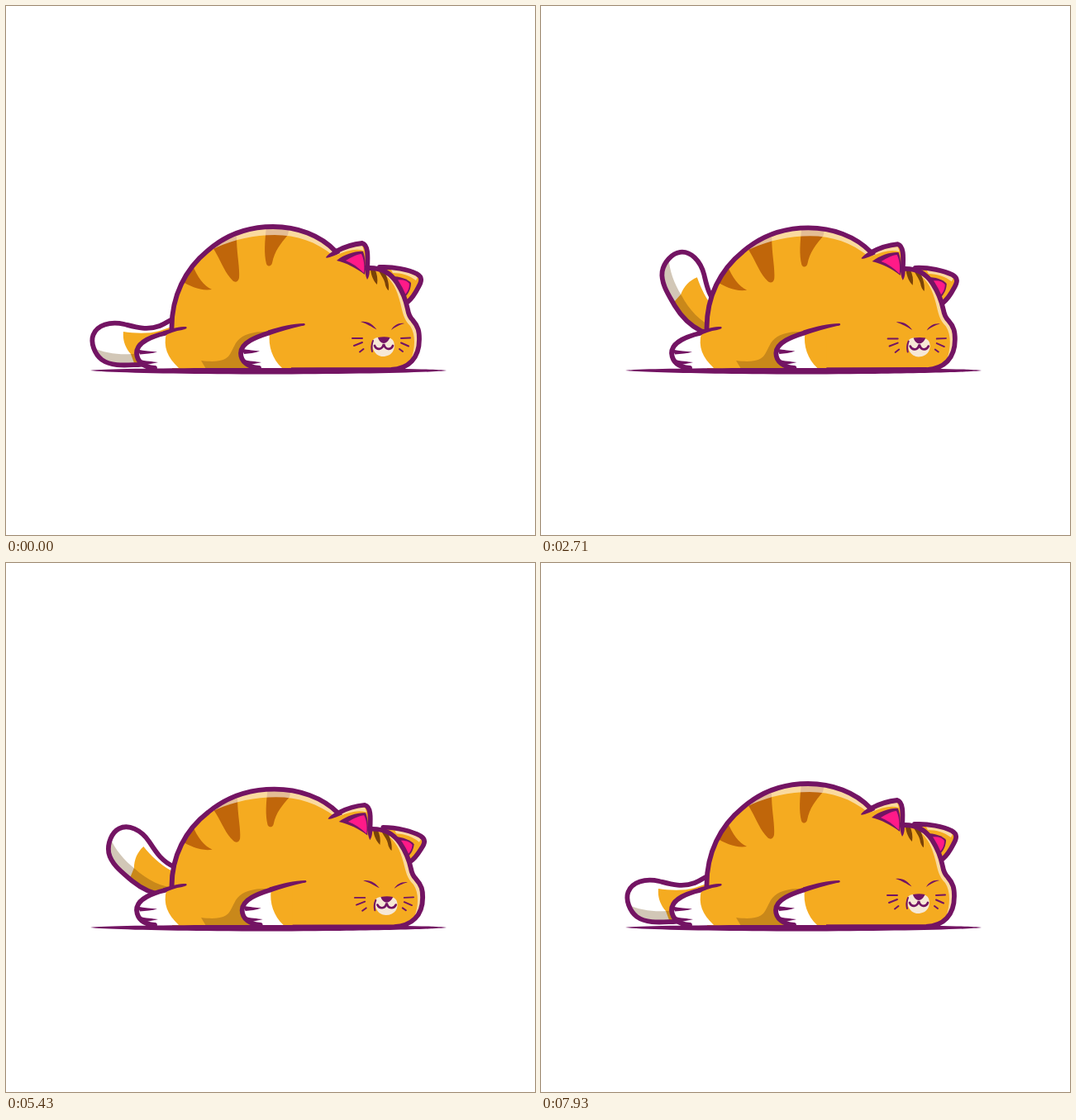
An HTML page that plays this animation: 640 px wide and 640 px high, repeating every 8000 ms.

```html
<!DOCTYPE html>
<html lang="en">
<head>
<meta charset="utf-8">
<title>Sleeping cat</title>
<style>
  html, body { margin: 0; width: 100%; height: 100%; overflow: hidden; background: #fff; }
  svg { display: block; width: 100vw; height: 100vh; }
  .line { fill: none; stroke: #731463; stroke-width: 5.8; stroke-linecap: round; stroke-linejoin: round; }
  .thin { fill: none; stroke: #731463; stroke-width: 2; stroke-linecap: round; }
  .ink { fill: #731463; }
  .fur { fill: #f5ab20; }
  .stripe { fill: #c0660a; }
  .brow { fill: #7a4208; }
  .pink { fill: #ff1a88; }
  .white { fill: #fff; }
  .shine { fill: #fff; opacity: .57; }
  .shade { fill: #c9881a; }
</style>
</head>
<body>
<svg viewBox="0 0 640 640">
  <defs>
    <path id="tailShape" d="M212 374 C200 378 196 383 186 387 C170 393 155 388 143 385 C126 381 110 386 105.500 398 C102 407 107 421 116 428 C128 436.500 145 434.500 160 434 C178 433 192 427 202 420 L220 400Z"/>
    <path id="bodyShape" d="M200.500 393 C200 351 217 318 244 296 C267 276 295 267 323 267 C352 267 380 277 399 297 L440 317 C455 317 466 324 473 335 C480 346 484 357 486 367 C487 373 489 377 492 380 C499 388 500 394 500 403 C500 426 487 439 466 440 L201 440Z"/>
    <clipPath id="tailClip"><use href="#tailShape"/></clipPath>
    <clipPath id="bodyClip"><use href="#bodyShape"/></clipPath>
  </defs>

  <g id="tail">
    <use href="#tailShape" class="white"/>
    <g clip-path="url(#tailClip)">
      <path class="fur" d="M142 394 C155 396 172 397 186 393 L215 383 V440 H158 C155 430 151 425 151 421 C144 413 141 404 142 394Z"/>
      <path fill="#d2c7b7" d="M104 413 C119 420 136 422 152 421 L158 438 H104Z"/>
      <path class="shade" d="M151 421 C174 421 190 416 208 403 L215 440 H158Z"/>
    </g>
    <use href="#tailShape" class="line"/>
  </g>

  <g id="body">
    <g id="farEar">
      <path class="fur" d="M452 316 C468 315 487 319 497 324 C504 328 503 333 499 340 C495 348 491 354 486 358Z"/>
      <path class="shine" d="M466 319 C480 319 492 322 498 328 L496 332 C488 326 479 323 468 323Z"/>
      <path class="ink" d="M466 327 C476 327 486 330 490 335 C490 342 487 348 482 353Z"/>
      <path class="pink" d="M470 332 C479 330 485 332 488 336 C488 342 486 346 481 351Z"/>
      <path class="line" d="M452 316 C468 315 487 319 497 324 C504 328 503 333 499 340 C495 348 491 354 486 358"/>
    </g>
    <use href="#bodyShape" class="fur"/>
    <g clip-path="url(#bodyClip)">
      <path class="stripe" d="M225 312 C232 329 239 338 249 343 C236 345 224 340 211 332Z"/>
      <path class="stripe" d="M250 292 C260 308 264 322 274 332 C277 335 281 334 282 329 C283 315 279 300 279 279 L265 270Z"/>
      <path class="stripe" d="M315 267 C313 285 312 300 315 312 C317 316 321 315 322 311 C325 296 332 288 341 277 L343 267Z"/>
      <path class="shine" d="M244 296 C267 276 295 267 323 267 C352 267 380 277 400 298 L396 302 C375 285 352 277 325 277 C296 277 270 284 244 297Z"/>
      <path class="shine" d="M456 318 C466 322 472 331 476 339 C483 350 484 363 489 376 C498 386 501 394 500 403 C500 412 497 421 490 428 C495 414 496 398 489 387 C481 379 480 371 477 359 C473 343 468 332 455 322Z"/>
      <path class="brow" d="M441 319 C442 327 445 333 449 337 C450 330 449 324 446 318Z M450 317 C452 325 458 329 459 338 C460 341 462 344 463 344 C464 334 460 324 455 317Z"/>
    </g>
    <path class="line" d="M200.500 391 C200 351 217 318 244 296 C267 276 295 267 323 267 C352 267 380 277 399 297 M440 317 C455 317 466 324 473 335 C480 346 484 357 486 367 C487 373 489 377 492 380 C499 388 500 394 500 403 C500 426 487 439 466 440 L300 440.500"/>
    <g>
      <path class="fur" d="M398 299 C408 293 420 288 431 287 C438 289 439 300 437 322 L420 320Z"/>
      <path class="shine" d="M401 299 C412 292 423 290 431 290 L433 296 C423 293 412 296 401 301Z"/>
      <path class="ink" d="M400 308 C410 300 424 296 432 297 C435 305 435 315 434 325 C424 317 412 311 400 308Z"/>
      <path class="pink" d="M411 308 C418 304 425 300 430 300 C433 306 434 314 433 323 C426 316 419 311 411 308Z"/>
      <path class="line" d="M399 297 C410 291 420 288 431 287 C438 289 438 301 437 318"/>
      <path class="ink" d="M402 293 C396 296 390 300 387 304 C387 306 395 303 404 299Z M434 314 C434 321 435 327 437 331 C440 327 440 321 440 314Z"/>
    </g>
    <path class="ink" d="M429 382 C437 380.500 444 385 448.500 391.500 C442 388 437 384.500 429 382Z M466 392 C469 386.500 475 383 482 384 C475 386 471 388.500 466 392Z"/>
    <g id="muzzle">
      <path fill="#f6e8d6" d="M444 404 C447 400 453 400 457 404 C461 400 467 401 469 406 C472 415 467 424 456 424 C447 424 441 414 444 404Z"/>
      <path class="ink" d="M450 401 C455 400 460 400 464.500 401 C463 405 460 408 457 408 C454 408 451 405 450 401Z"/>
      <path class="thin" stroke-width="2" d="M444 405 C442 410 442 414 443 418"/>
      <path class="thin" style="stroke-width: 2.700" d="M446 411 C448 416 455 417 457 409 C459 417 466 416 468 411"/>
      <path class="thin" d="M419 402 L431 402 M421 411 L431 407 M428 418.500 L432.500 415 M478 402 L489 401.500 M478 407.500 L487 411.500 M476 415 L480 418"/>
    </g>
  </g>

  <path class="shade" d="M236 429 C252 431 263 430 269 424 C276 415 276 406 286 400 C295 395 304 394 314 394 L314 439 H242Z"/>

  <g id="backLeg">
    <path class="fur" d="M190 397 L206 393 V438 H190Z"/>
    <path class="white" d="M194 396 C180 399 157 406 158 420 C159 431 167 437 180 438 H209 C195 425 190 412 194 396Z"/>
    <path class="line" d="M192 396 C179 399 158 406 158 420 C159 431 167 437 180 438"/>
    <path class="ink" d="M190 393.500 C200 390 210 388 218 388 C220 390 217 391 213 392 C205 393 198 396 191 399Z"/>
    <path class="ink" d="M159 415.500 C168 417.500 176 417.500 183 418.500 C177 420.500 169 421 162 421.500Z M160 427.500 C170 430 177 430 184 431 C176 433 171 434 166 434.500Z"/>
  </g>

  <g id="arm">
    <path class="fur" d="M315 396 L345 390 V438 H315Z"/>
    <path class="white" d="M319 396 C306 399 284 407 284 420 C284 431 294 437 306 438 H334 C322 427 317 411 319 396Z"/>
    <path class="line" d="M318 395.500 C304 400 284 407 284 420 C284 431 294 437 306 438"/>
    <path class="ink" d="M317 392.500 C332 388 347 384 361 384 C363 386 361 387 358 387 C344 390 331 394 318 398.500Z"/>
    <path class="ink" d="M285 414.500 C294 416.500 300 416.500 307 417.500 C301 420 294 420.500 288 421Z M286 427.500 C295 430 302 430 309 431 C301 433 297 434 292 434.500Z"/>
  </g>

  <path class="ink" d="M102 441 C120 438.500 220 438 317 438 C415 438 515 438.500 533 441 C515 443.500 415 445.500 317 445.500 C220 445.500 120 443.500 102 441Z"/>
</svg>

<script>
  const LOOP = 8000, STEP = LOOP / 112;
  const beats = [0, 1200, 2450, 3600, 4760, 5950, 7140, LOOP];
  const breath = [0, 1, 0, 1, 0, 1, 0, 0];
  const tailAngle = [0, 70, 71, 0, 0, 71, 0, 0];
  const part = id => document.getElementById(id);
  const [tail, body, farEar, muzzle, arm] = ['tail', 'body', 'farEar', 'muzzle', 'arm'].map(part);

  function eased(values, t) {
    let i = 0;
    while (i < beats.length - 2 && t >= beats[i + 1]) i++;
    const p = (t - beats[i]) / (beats[i + 1] - beats[i]);
    return values[i] + (values[i + 1] - values[i]) * (1 - Math.cos(Math.PI * p)) / 2;
  }

  function draw(now) {
    const t = Math.floor(((now + 5) % LOOP) / STEP) * STEP;
    const k = eased(breath, t);
    tail.setAttribute('transform', `rotate(${eased(tailAngle, t)} 220 400)`);
    // The torso flattens towards the floor and stretches to the right.
    body.setAttribute('transform',
      `translate(199 440) scale(${1 + .023 * k} ${1 - .064 * k}) translate(-199 -440)`);
    farEar.setAttribute('transform', `rotate(${6 * k} 470 330)`);
    muzzle.setAttribute('transform', `translate(0 ${2.5 * k})`);
    arm.setAttribute('transform', `translate(${2.8 * k} 0)`);
  }

  function tick() {
    draw(performance.now());
    requestAnimationFrame(tick);
  }
  tick();
</script>
</body>
</html>
```
